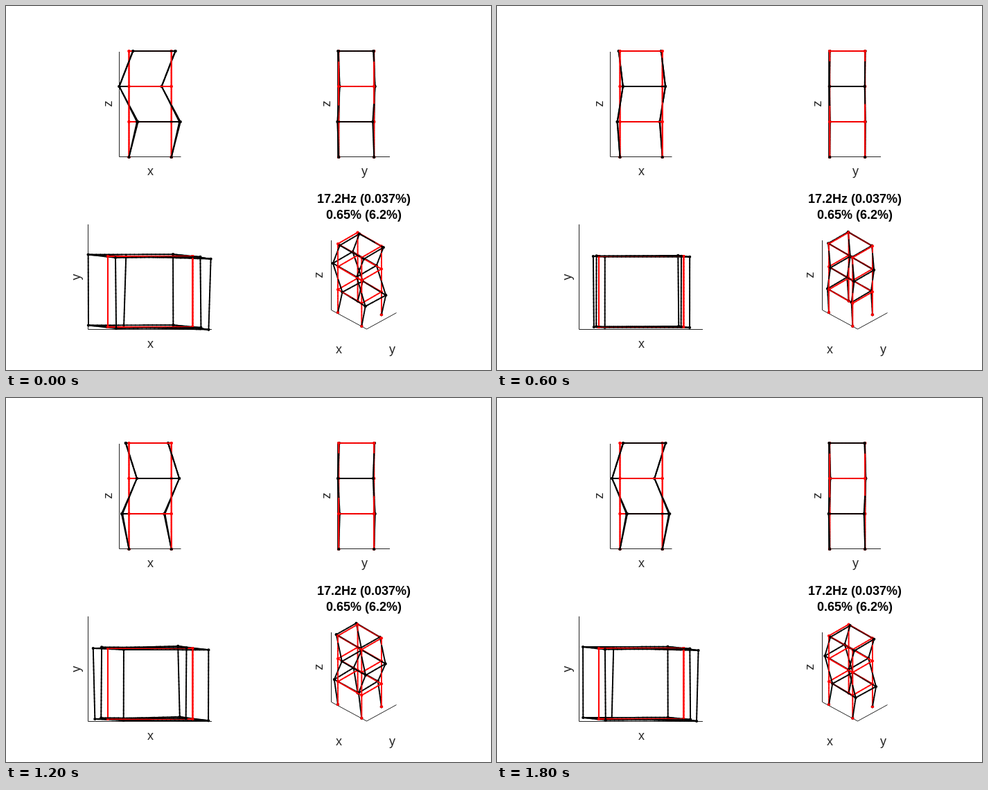
Recreate the animation shown at these times as an HTML page with a canvas. Size 700 px wide and 525 px high, loop 2 s.

```html
<!DOCTYPE html>
<html>
<head>
<meta charset="utf-8">
<style>
  html, body { margin: 0; width: 100%; height: 100%; overflow: hidden; background: #fff; }
  canvas { display: block; }
</style>
</head>
<body>
<canvas id="stage" width="700" height="525"></canvas>
<script>
const ctx = document.getElementById("stage").getContext("2d");
const STEP = 200, STEPS = 10, PIECES = 20;
const RED = "#f00", BLACK = "#000", GREY = "#262626";
const FONT = "18px Arial, 'Liberation Sans', sans-serif";
const CORNERS = [[0, 0], [1.2, 0], [1.2, 1], [0, 1]];

// Mode shape per level, in hundredths of a bay: shift in x, shift in y, rotation
const MODE = [[0, 0, 0], [22.6, 0, 3.1], [-27.5, 2.4, -0.3], [11.8, -2, -1]];

// Each view maps a point to [screen x, screen y, nearness]
const VIEWS = [
  {
    project: ([x, y, z]) => [177.5 + 51 * x, 218 - 51 * z, -y],
    axes: [[163.5, 66], [163.5, 217.5], [252.5, 217.5]],
    labels: [["x", 208.5, 244], ["z", 153, 141, true]]
  },
  {
    project: ([x, y, z]) => [480.2 + 51 * y, 218 - 51 * z, x],
    axes: [[478.5, 66], [478.5, 217.5], [554, 217.5]],
    labels: [["y", 517.5, 244], ["z", 468, 141, true]]
  },
  {
    project: ([x, y, z]) => [147 + 102 * x, 463 - 102 * y, z],
    axes: [[118.5, 315], [118.5, 466.5], [297, 466.5]],
    labels: [["x", 208.5, 493], ["y", 107, 391, true]]
  },
  {
    project: ([x, y, z]) => [479 + 28.6 * (x + y), 442 + 16.5 * (x - y) - 33 * z, x - y + z],
    axes: [[469.5, 338], [469.5, 438.5], [520.5, 466], [563.5, 442.5]],
    labels: [["x", 480.5, 501], ["y", 557.5, 501], ["z", 457, 388, true]],
    redBase: true
  }
];

function frameNodes(amount) {
  return MODE.map(([sx, sy, turn], level) => CORNERS.map(([x, y]) => [
    x + amount * (sx + turn * y) / 100,
    y + amount * (sy - turn * x) / 100,
    level
  ]));
}

function frameEdges(nodes) {
  const edges = [];
  for (let level = 1; level < 4; level++) {
    for (let c = 0; c < 4; c++) {
      edges.push([nodes[level - 1][c], nodes[level][c]]);
      edges.push([nodes[level][c], nodes[level][(c + 1) % 4]]);
    }
  }
  return edges;
}

const mix = (a, b, t) => a.map((v, i) => v + (b[i] - v) * t);

// Cut edges into short pieces so that depth sorting resolves crossings
function collect(view, nodes, color, items) {
  for (const [a, b] of frameEdges(nodes)) {
    const p = view.project(a), q = view.project(b);
    for (let i = 0; i < PIECES; i++) {
      items.push({
        color,
        from: mix(p, q, i / PIECES),
        to: mix(p, q, Math.min(1, (i + 1.2) / PIECES)),
        near: mix(p, q, (i + 0.5) / PIECES)[2]
      });
    }
  }
  for (const node of nodes.flat()) {
    const dot = view.project(node);
    const lift = view.redBase && color === RED && node[2] === 0 ? 0.04 : 0;
    items.push({ color, dot, near: dot[2] + lift });
  }
}

function line(points, color, width) {
  ctx.strokeStyle = color;
  ctx.lineWidth = width;
  ctx.beginPath();
  points.forEach(([x, y]) => ctx.lineTo(x, y));
  ctx.stroke();
}

function label(text, x, y, upright) {
  ctx.save();
  ctx.translate(x, y);
  if (upright) ctx.rotate(-Math.PI / 2);
  ctx.fillText(text, 0, 0);
  ctx.restore();
}

function drawView(view, still, moved) {
  line(view.axes, GREY, 1);
  ctx.font = FONT;
  ctx.fillStyle = GREY;
  view.labels.forEach(l => label(...l));

  const items = [];
  collect(view, still, RED, items);
  collect(view, moved, BLACK, items);
  items.sort((a, b) => a.near - b.near);
  for (const { color, dot, from, to } of items) {
    if (dot) {
      ctx.fillStyle = color;
      ctx.beginPath();
      ctx.arc(dot[0], dot[1], 2.1, 0, 2 * Math.PI);
      ctx.fill();
    } else {
      line([from, to], color, 1.9);
    }
  }
}

function draw(step) {
  ctx.fillStyle = "#fff";
  ctx.fillRect(0, 0, 700, 525);
  ctx.textAlign = "center";
  const still = frameNodes(0);
  const moved = frameNodes(Math.cos(2 * Math.PI * step / STEPS));
  VIEWS.forEach(view => drawView(view, still, moved));
  ctx.font = "bold " + FONT;
  ctx.fillStyle = BLACK;
  label("17.2Hz (0.037%)", 516.5, 284);
  label("0.65% (6.2%)", 516.5, 307);
}

let shown = -1;
function tick() {
  const step = Math.floor(performance.now() / STEP) % STEPS;
  if (step !== shown) draw(shown = step);
  requestAnimationFrame(tick);
}
tick();
</script>
</body>
</html>
```
